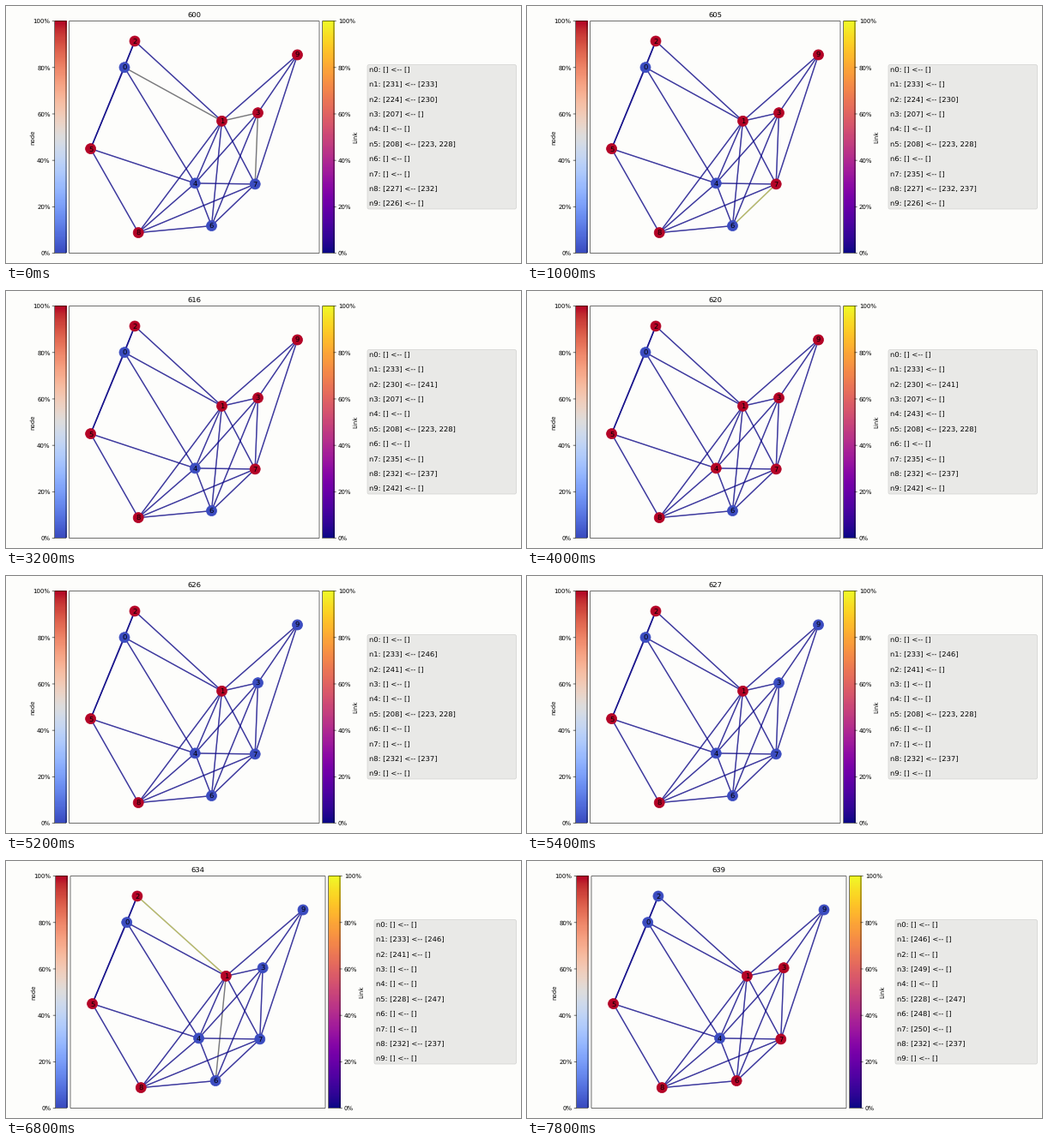
A matplotlib script that plays this animation: 600 by 300 pixels, repeating every 8000 ms.

```python
import matplotlib.pyplot as plt
import numpy as np
from matplotlib.animation import FuncAnimation
from matplotlib.patches import FancyBboxPatch, Rectangle

W, H, DPI = 600, 300, 50
PT = DPI / 72  # pixels per point
FRAMES, STEP_MS = 40, 200
FIRST_TICK = 600
BG = "#fdfdfb"
TOP, BOTTOM = 17.7, 288.4

plt.rcParams.update({"font.family": "DejaVu Sans", "text.hinting": "none"})
coolwarm, plasma = plt.get_cmap("coolwarm"), plt.get_cmap("plasma")

# node positions in pixels of the narrow layout
NODES = [(138, 71.7), (251.5, 134.3), (150, 41), (293.5, 124.7), (220.3, 206.9),
         (98.6, 166.6), (239.5, 256.6), (290.2, 207.9), (154.2, 264.6), (339.5, 57)]

# neighbours with a higher number, node by node
LINKS = ["1245", "2346789", "5", "4679", "5678", "8", "78", "89"]
PAIRS = [(u, int(v)) for u, ends in enumerate(LINKS) for v in ends]
EDGES = sorted(PAIRS + [(v, u) for u, v in PAIRS])

# tasks present at the start, per node
QUEUED = {1: [231, 233], 2: [224, 230], 3: [207], 5: [208, 223, 228],
          8: [227, 232], 9: [226]}
# later tasks in order of arrival, each with the nodes it passes
ROUTES = {235: "0137", 237: "48", 239: "76", 240: "16", 241: "12", 242: "19",
          243: "54", 246: "841", 247: "45", 248: "216", 249: "13", 250: "37"}
# tasks in order of completion
FINISHED = [231, 226, 227, 224, 239, 240, 207, 235, 230, 243, 242, 208, 223, 233, 241]


def ticks(ids, key_index, key_tick):
    """Spread the tasks over time between a few key ticks."""
    times = np.rint(np.interp(range(len(ids)), key_index, key_tick)).astype(int)
    return dict(zip(ids, times))


ARRIVE = ticks(ROUTES, [0, 4, 8, 9, 11], [1, 10, 29, 35, 39])
DONE = ticks(FINISHED, [0, 5, 6, 10, 14], [4, 15, 21, 25, 39])

fig = plt.figure(figsize=(W / DPI, H / DPI), dpi=DPI, facecolor=BG)
ax = fig.add_axes([0, 0, 1, 1])


def label(x, y, text, size=12, **kw):
    kw = {"ha": "center", "va": "center", "zorder": 5, **kw}
    ax.text(x, y, text, fontsize=size, **kw)


def frame_box(x0, x1):
    ax.add_patch(Rectangle((x0, TOP), x1 - x0, BOTTOM - TOP, fill=False,
                           ec="black", lw=0.8, snap=False, zorder=4))


def colorbar(x, cmap, name, side):
    """Vertical bar with ticks on the left (side -1) or on the right (side 1)."""
    x1 = x + 13.5
    ramp = np.linspace(1, 0, 256)[:, None]
    ax.imshow(ramp, cmap=cmap, extent=(x, x1, BOTTOM, TOP), aspect="auto",
              vmin=0, vmax=1, zorder=1)
    frame_box(x, x1)
    edge = x if side < 0 else x1
    for i in range(6):
        y = BOTTOM + (TOP - BOTTOM) * i / 5
        ax.plot([edge, edge + 3.5 * PT * side], [y, y], color="black", lw=0.8, snap=False)
        label(edge + 7 * PT * side, y, f"{20 * i}%", 10, va="center_baseline",
              ha="right" if side < 0 else "left")
    label(edge + 25 * side, (TOP + BOTTOM) / 2, name, 10, rotation=90)


def status(k):
    """Tasks at every node, first come first served."""
    rows = [list(QUEUED.get(i, [])) for i in range(len(NODES))]
    for task, route in ROUTES.items():
        if ARRIVE[task] <= k:
            rows[int(route[-1])].append(task)
    return [[t for t in row if k < DONE.get(t, FRAMES)] for row in rows]


def busy_links(k):
    """Every hop of a route is loaded during the tick before arrival."""
    return {(int(u), int(v)) for task, route in ROUTES.items()
            if ARRIVE[task] == k + 1 for u, v in zip(route, route[1:])}


def draw_graph(k, rows, left, right):
    scale = (right - left) / 291.5
    pts = [(left + (x - 73.5) * scale, y) for x, y in NODES]
    busy = busy_links(k)
    for u, v in EDGES:
        ax.plot(*zip(pts[u], pts[v]), color=plasma(float((u, v) in busy)),
                alpha=0.55, lw=2, zorder=2, solid_capstyle="butt")
    colors = [coolwarm(float(bool(row))) for row in rows]
    ax.scatter(*zip(*pts), s=300, c=colors, linewidths=1, edgecolors="face", zorder=3)
    for i, (x, y) in enumerate(pts):
        label(x, y, str(i), va="center_baseline")
    frame_box(left, right)
    label((left + right) / 2, TOP - 6 * PT, str(FIRST_TICK + k), va="baseline")


def draw_table(rows, left):
    ax.add_patch(FancyBboxPatch((left + 2, 70.5), 590.5 - left, 164.5,
                                boxstyle="round,pad=2,rounding_size=2",
                                fc="#e9e9e7", ec="#d2d2d0", lw=1, zorder=1))
    for i, row in enumerate(rows):
        label(left + 2, 77 + 17.35 * i, f"n{i}: {row[:1]} <-- {row[1:]}",
              ha="left", va="baseline")


def draw(k):
    ax.clear()
    ax.axis("off")
    rows = status(k)
    # the longest row decides how much room the table takes
    if max(map(len, rows)) > 2:
        node_x, left, right, link_x, table_x = 56.5, 73.5, 365, 368.5, 421
    else:
        node_x, left, right, link_x, table_x = 57.5, 75, 372, 375.5, 429
    colorbar(node_x, coolwarm, "node", -1)
    colorbar(link_x, plasma, "Link", 1)
    draw_graph(k, rows, left, right)
    draw_table(rows, table_x)
    ax.set_xlim(0, W)
    ax.set_ylim(H, 0)
    return []


anim = FuncAnimation(fig, draw, frames=FRAMES, init_func=lambda: draw(0),
                     interval=STEP_MS, repeat=True, repeat_delay=0)
plt.show()
```
